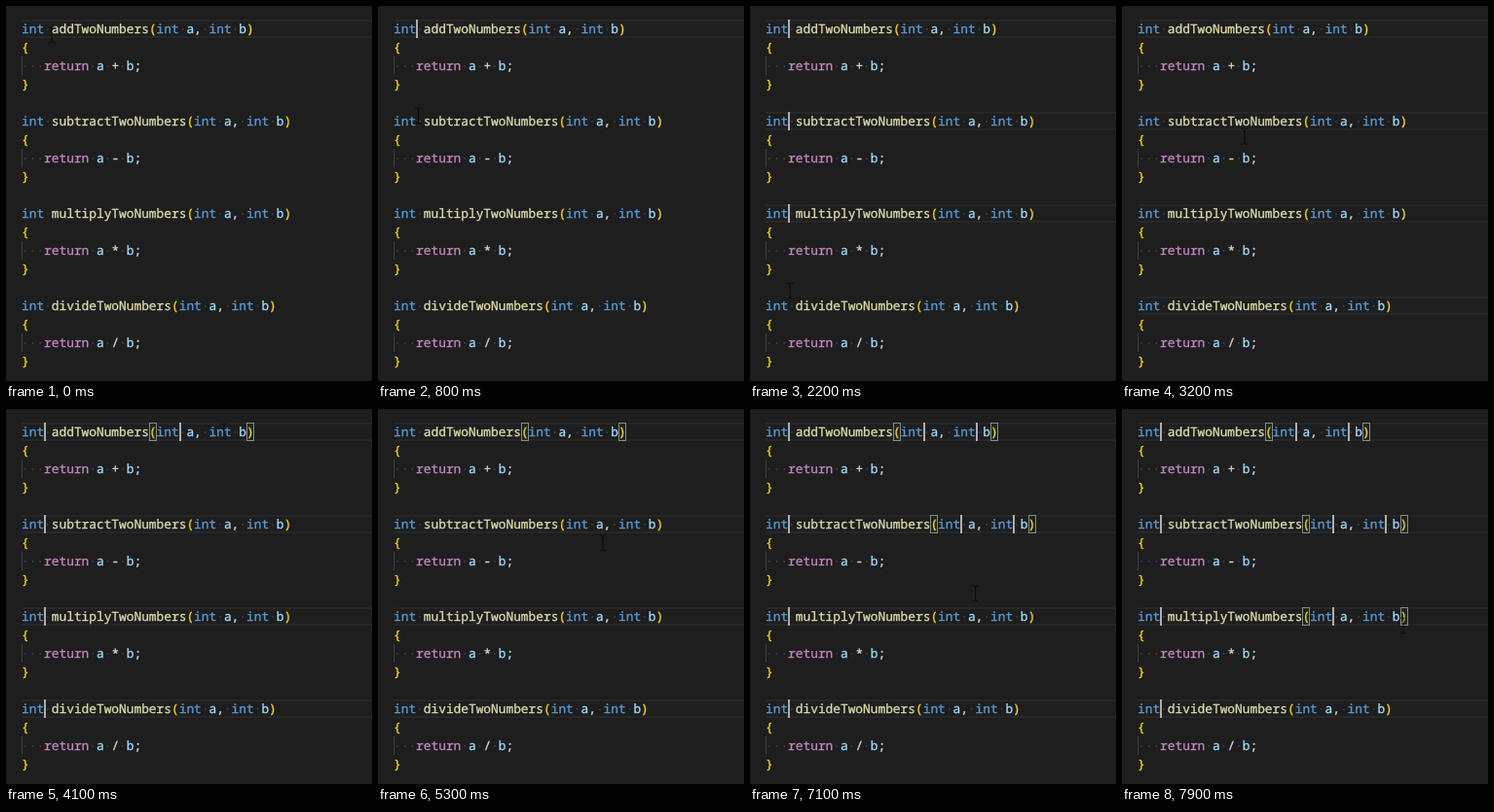
An HTML page that plays this animation: 376x386 px, repeating every 8000 ms.

```html
<!DOCTYPE html>
<html lang="en">
<head>
<meta charset="utf-8">
<title>Multiple cursors</title>
<style>
  html, body { margin: 0; width: 100%; height: 100%; overflow: hidden; background: #1e1e1e; }
  svg { display: block; width: 376px; height: 386px; }
  text {
    font: 12.833px "Noto Sans Mono", "DejaVu Sans Mono", monospace;
    text-rendering: geometricPrecision;
    white-space: pre;
    stroke-width: 0.3px;
  }
</style>
</head>
<body>
<svg viewBox="0 0 376 386">
  <g id="rows" fill="#272727"></g>
  <g id="brackets" fill="#006400" fill-opacity=".1" stroke="#888"></g>
  <g id="code"></g>
  <g id="carets" fill="#aeafad"></g>
  <path id="mouse" d="M-3.5-8H-1.5L0-7 1.5-8H3.5M0-7V7M-3.5 8H-1.5L0 7 1.5 8H3.5" fill="none" stroke="#000" stroke-opacity=".65"/>
</svg>
<script>
const NS = 'http://www.w3.org/2000/svg';
const LOOP = 8000, BLINK = 500, TRAVEL = 800;
const LEFT = 16, TOP = 14, CELL = 7.7, LINE = 19;
const $ = id => document.getElementById(id);
const colX = c => LEFT + c * CELL;
const rowY = r => TOP + r * LINE;

function add(parent, tag, attrs, text) {
  const el = document.createElementNS(NS, tag);
  for (const k in attrs) el.setAttribute(k, attrs[k]);
  if (text) el.textContent = text;
  parent.appendChild(el);
  return el;
}

const functions = [['add', '+'], ['subtract', '-'], ['multiply', '*'], ['divide', '/']];
const lines = functions.flatMap(([name, op]) => [
  `int ${name}TwoNumbers(int a, int b)`, '{', `   return a ${op} b;`, '}', ''
]);

function color(token) {
  if (token === 'int') return '#569cd6';
  if (token === 'return') return '#c586c0';
  if (/^[(){}]$/.test(token)) return '#ffd700';
  if (/^[ab]$/.test(token)) return '#9cdcfe';
  return /^\w/.test(token) ? '#dcdcaa' : '#d4d4d4';
}

lines.forEach((line, row) => {
  const y = rowY(row);
  if (line.startsWith(' ')) add($('code'), 'rect', { x: LEFT, y, width: 1, height: LINE, fill: '#404040' });
  for (const { 0: token, index } of line.matchAll(/\w+|\s|[^\w\s]/g)) {
    const x = colX(index), fill = color(token);
    if (token === ' ') add($('code'), 'circle', { cx: x + CELL / 2, cy: y + 10, r: 0.9, fill: '#424242' });
    else add($('code'), 'text', { x, y: y + 14, fill, stroke: fill }, token);
  }
});

// Every "int" gets a caret behind it: return types first, then parameters
const ints = lines.flatMap((line, row) =>
  [...line.matchAll(/\bint\b/g)].map(m => ({ row, col: m.index + 3 })));
const targets = [...ints.filter(p => p.col === 3), ...ints.filter(p => p.col > 3)];
const times = [-500, 1000, 1900, 2400, 3700, 4400, 5900, 6700, 7500];
const clicks = times.map((time, i) => ({ time, ...targets[i] }));

const marks = [], boxed = new Set();
const carets = clicks.map(({ time, row, col }) => {
  const y = rowY(row);
  if (col === 3) {
    for (const dy of [0, LINE - 2]) {
      marks.push({ time, el: add($('rows'), 'rect', { x: LEFT, y: y + dy, width: 360, height: 2 }) });
    }
  } else if (!boxed.has(row)) {
    boxed.add(row);
    for (const c of '()') {
      const x = Math.round(colX(lines[row].indexOf(c))) + 0.5;
      marks.push({ time, el: add($('brackets'), 'rect', { x, y: y + 0.5, width: 7, height: LINE - 1 }) });
    }
  }
  return { time, el: add($('carets'), 'rect', { x: Math.round(colX(col)), y, width: 2, height: LINE }) };
});

// The pointer visits each click, with a few stops in between
const stops = [
  { time: 0, x: 47, y: 30 }, { time: 5300, x: 231, y: 138 }, { time: 7900, x: 289, y: 223 },
  ...clicks.slice(1).map(({ time, row, col }) => ({ time, x: colX(col) + 2, y: rowY(row) + LINE / 2 }))
].sort((a, b) => a.time - b.time);

function pointer(t) {
  const i = stops.findIndex(s => s.time > t);
  if (i < 0) return stops[stops.length - 1];
  const from = stops[i - 1], to = stops[i];
  const span = Math.min(TRAVEL, to.time - from.time);
  const left = Math.min(1, (to.time - t) / span) ** 2;
  return { x: to.x + (from.x - to.x) * left, y: to.y + (from.y - to.y) * left };
}

const show = (el, on) => el.setAttribute('visibility', on ? 'visible' : 'hidden');

function render(t) {
  const last = Math.max(...times.filter(time => time <= t));
  const lit = Math.floor((t - last) / BLINK) % 2 === 0;
  for (const { time, el } of carets) show(el, lit && t >= time);
  for (const { time, el } of marks) show(el, t >= time);
  const { x, y } = pointer(t);
  $('mouse').setAttribute('transform', `translate(${x} ${y})`);
}

const start = performance.now();
function tick() {
  render((performance.now() - start) % LOOP);
  requestAnimationFrame(tick);
}
tick();
</script>
</body>
</html>
```
